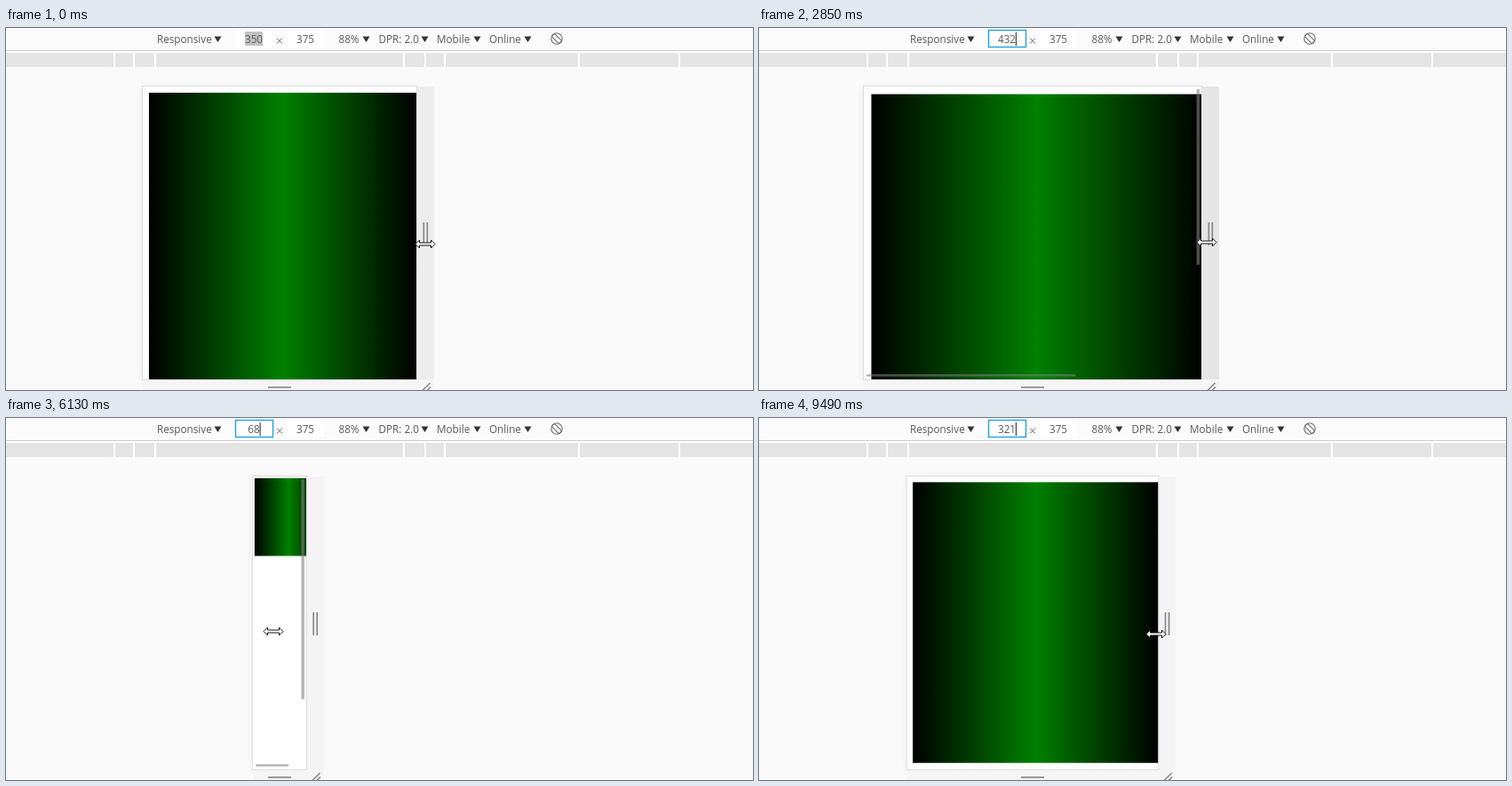
Recreate the animation shown at these times as an HTML page. Size 841 by 408 pixels, loop 9580 ms.

```html
<!DOCTYPE html>
<html lang="en">
<head>
<meta charset="utf-8">
<title>Responsive resize</title>
<style>
html, body { margin: 0; width: 100%; height: 100%; overflow: hidden; background: #fafafa; }
svg { display: block; width: 841px; height: 408px; }
text { font: 11.7px "Open Sans", "Noto Sans", sans-serif; fill: #5a5a5a; }
.mid { text-anchor: middle; }
</style>
</head>
<body>
<svg viewBox="0 0 841 408">
  <defs>
    <linearGradient id="green">
      <stop offset="0" stop-color="#000"/>
      <stop offset=".5" stop-color="#008000"/>
      <stop offset="1" stop-color="#000"/>
    </linearGradient>
    <filter id="blur" x="-20%" y="-20%" width="140%" height="140%"><feGaussianBlur stdDeviation="5"/></filter>
    <clipPath id="view"><rect id="viewRect" y="66" height="330"/></clipPath>
  </defs>
  <rect width="841" height="408" fill="#fafafa"/>

  <rect id="shadow" y="67" height="330" fill="#000" opacity=".07" filter="url(#blur)"/>
  <rect id="sideHandle" y="66" width="20" height="331"/>
  <rect id="bottomHandle" y="396" height="12" fill="#f5f5f5"/>
  <g id="grips" fill="none" stroke="#858585" stroke-width="1.6">
    <path d="M8.3 219v26M12.3 219v26"/>
    <path d="M7 408.5l8.500-8.500M12 408.500l4-4" stroke-width="1.4"/>
  </g>
  <path d="M295 405h26" stroke="#999" stroke-width="2"/>

  <rect id="frame" y="65.500" height="331" fill="#fff" stroke="#dedede"/>
  <g clip-path="url(#view)"><rect id="box" fill="url(#green)"/></g>
  <g id="bars" fill="#828282" fill-opacity=".58">
    <rect id="barY" y="69" width="3.500" rx="1"/>
    <rect id="barX" y="390.300" height="2.500" rx="1"/>
  </g>

  <g id="ruler">
    <rect width="841" height="26" fill="#fbfbfb"/>
    <rect y="25" width="841" height="1" fill="#cdcdcd"/>
    <rect y="26" width="841" height="2" fill="#fff"/>
    <rect y="28" width="841" height="16" fill="#e5e5e5"/>
  </g>
  <g id="toolbar">
    <rect x="258" y="3" width="43" height="19" fill="#fff"/>
    <rect x="316" y="3" width="42" height="19" fill="#fff"/>
    <rect id="selection" x="269" y="4" width="20" height="16" fill="#c3c3c3"/>
    <rect id="focus" x="258.500" y="2.500" width="42" height="19" fill="#fff" stroke="#29a7df" stroke-width="1.500"/>
    <text id="value" class="mid" x="279" y="17"></text>
    <rect id="caret" y="5" width="1" height="15" fill="#222"/>
    <path d="M305 11.500l6 6m0-6l-6 6" stroke="#666"/>
    <text class="mid" x="337" y="17">375</text>
    <g fill="none" stroke="#6e6e6e" stroke-width="1.100">
      <circle cx="620" cy="12" r="6.200"/>
      <rect x="614" y="9.800" width="12" height="4.400" rx="1" transform="rotate(45 620 12)"/>
    </g>
  </g>

  <path id="cursor" fill="#fff" stroke="#111" stroke-linejoin="round"
    d="M-11 0l4.500-4.500v3h13v-3l4.500 4.500l-4.500 4.500v-3h-13v3z"/>
</svg>
<script>
const LOOP = 9580, ZOOM = 0.88, CENTER = 308, MARGIN = 0.0225;
const el = Object.fromEntries([...document.querySelectorAll('[id]')].map(e => [e.id, e]));

// Repaint bursts: first repaint, last repaint, number of repaints.
const bursts = [
  [680, 1540, 10], [1690, 1840, 3], [2000, 2670, 8], [2850, 2950, 2], [3110, 3310, 3],
  [3760, 4640, 10], [4740, 5670, 11], [5750, 6130, 5], [6300, 7240, 11],
  [7340, 7980, 8], [8160, 8380, 3], [8910, 9490, 7]
];

// Time, frame width, page width, pointer x, pointer y.
const keys = [
  [0, 350, 350, 472, 243], [600, 350, 350, 472, 243], [680, 354, 350, 476, 243],
  [1253, 525, 482, 559, 243], [1540, 661, 655, 614, 243], [1690, 690, 690, 625, 242],
  [1840, 700, 700, 627, 242], [2000, 690, 690, 620, 242], [2670, 455, 455, 510, 241],
  [2850, 432, 432, 504, 241], [3660, 432, 432, 504, 241], [3760, 440, 440, 512, 240],
  [4347, 673, 673, 630, 240], [4640, 900, 890, 726, 240], [4740, 945, 945, 737, 240],
  [4850, 955, 955, 736, 240], [5670, 240, 240, 395, 240], [5750, 205, 205, 372, 240],
  [6130, 68, 68, 301, 240], [6300, 72, 72, 305, 240], [7240, 316, 302, 462, 243],
  [7797, 432, 398, 505, 244], [7980, 432, 432, 505, 244], [8810, 432, 432, 505, 244],
  [8910, 428, 428, 502, 244], [9490, 321, 321, 447, 243]
];

function set(node, attrs) {
  for (const name in attrs) node.setAttribute(name, attrs[name]);
}

function add(parent, tag, attrs, text = '') {
  const node = document.createElementNS('http://www.w3.org/2000/svg', tag);
  set(node, attrs);
  node.textContent = text;
  parent.append(node);
}

for (const x of [122, 144, 168, 448, 472, 494, 645, 758])
  add(el.ruler, 'rect', { x: x - 1, y: 28, width: 2, height: 16, fill: '#fff' });

for (const [x, label, arrow] of [
  [170, 'Responsive', 238.5], [374.5, '88%', 405.5], [419.5, 'DPR: 2.0', 471.5],
  [485, 'Mobile', 530.5], [544, 'Online', 587.5]
]) {
  add(el.toolbar, 'text', { x, y: 17 }, label);
  add(el.toolbar, 'path', { d: `M${arrow - 4} 9.5h8l-4 6.500z`, fill: '#333' });
}

function snap(t) {
  let time = 0;
  for (const [start, end, count] of bursts) {
    if (t < start) break;
    const step = (end - start) / (count - 1);
    time = start + step * Math.min(count - 1, Math.floor((t - start + 20) / step));
  }
  return time;
}

function poseAt(t) {
  const next = keys.findIndex(k => k[0] > t);
  if (next < 0) return keys[keys.length - 1].slice(1);
  const a = keys[next - 1], b = keys[next];
  const p = (t - a[0]) / (b[0] - a[0]);
  return a.slice(1).map((v, i) => v + (b[i + 1] - v) * p);
}

function barOpacity(t, width) {
  if (t < 680) return 0;
  for (const [start, end, resume] of [[3110, 3310, 3760], [8160, 8380, 8910]])
    if (t >= start && t < resume) return Math.max(0, 0.7 * (end - t) / (end - start));
  return t >= 8910 && width < 345 ? 0 : 1;
}

function handleColor(t, offset) {
  if (t < 80) return '#ededed';
  if (offset < 0) return '#f4f4f4';
  return offset > 20 ? '#e9e9e9' : '#e5e5e5';
}

function render(t) {
  const time = snap(t);
  const [frameWidth, pageWidth, cx, cy] = poseAt(time);
  const width = frameWidth * ZOOM, left = CENTER - width / 2, right = left + width;
  const shellWidth = pageWidth * ZOOM, shellLeft = CENTER - shellWidth / 2, shellRight = shellLeft + shellWidth;

  set(el.shadow, { x: shellLeft, width: shellWidth });
  set(el.sideHandle, { x: shellRight, fill: handleColor(t, cx - shellRight) });
  set(el.bottomHandle, { x: shellLeft, width: shellWidth + 20 });
  set(el.grips, { transform: `translate(${shellRight} 0)` });
  set(el.frame, { x: left - 0.5, width: width + 1 });
  set(el.viewRect, { x: left, width });

  const size = Math.max(89, pageWidth) * ZOOM, margin = size * MARGIN;
  const boxRight = left + margin + size * 0.98;
  set(el.box, { x: left + margin, y: 66 + margin, width: size * 0.98, height: size * 1.12 });

  const scrollHeight = 1.24 * pageWidth ** 2 / 375;
  set(el.bars, { opacity: barOpacity(time, pageWidth) });
  set(el.barY, {
    x: Math.min(right, boxRight) - 5.5,
    height: Math.min(248, 326 * 375 / scrollHeight)
  });
  set(el.barX, { x: left + 3, width: Math.min(307, width * 0.62) });

  const focused = t >= 680, value = String(Math.round(pageWidth));
  set(el.selection, { opacity: focused ? 0 : 1 });
  set(el.focus, { opacity: focused ? 1 : 0 });
  set(el.caret, { opacity: focused ? 1 : 0, x: 279 + value.length * 3.3 });
  el.value.textContent = value;
  set(el.cursor, { transform: `translate(${cx} ${cy + 0.5})` });
}

const begin = performance.now();
function tick() {
  render((performance.now() - begin) % LOOP);
  requestAnimationFrame(tick);
}
tick();
</script>
</body>
</html>
```
